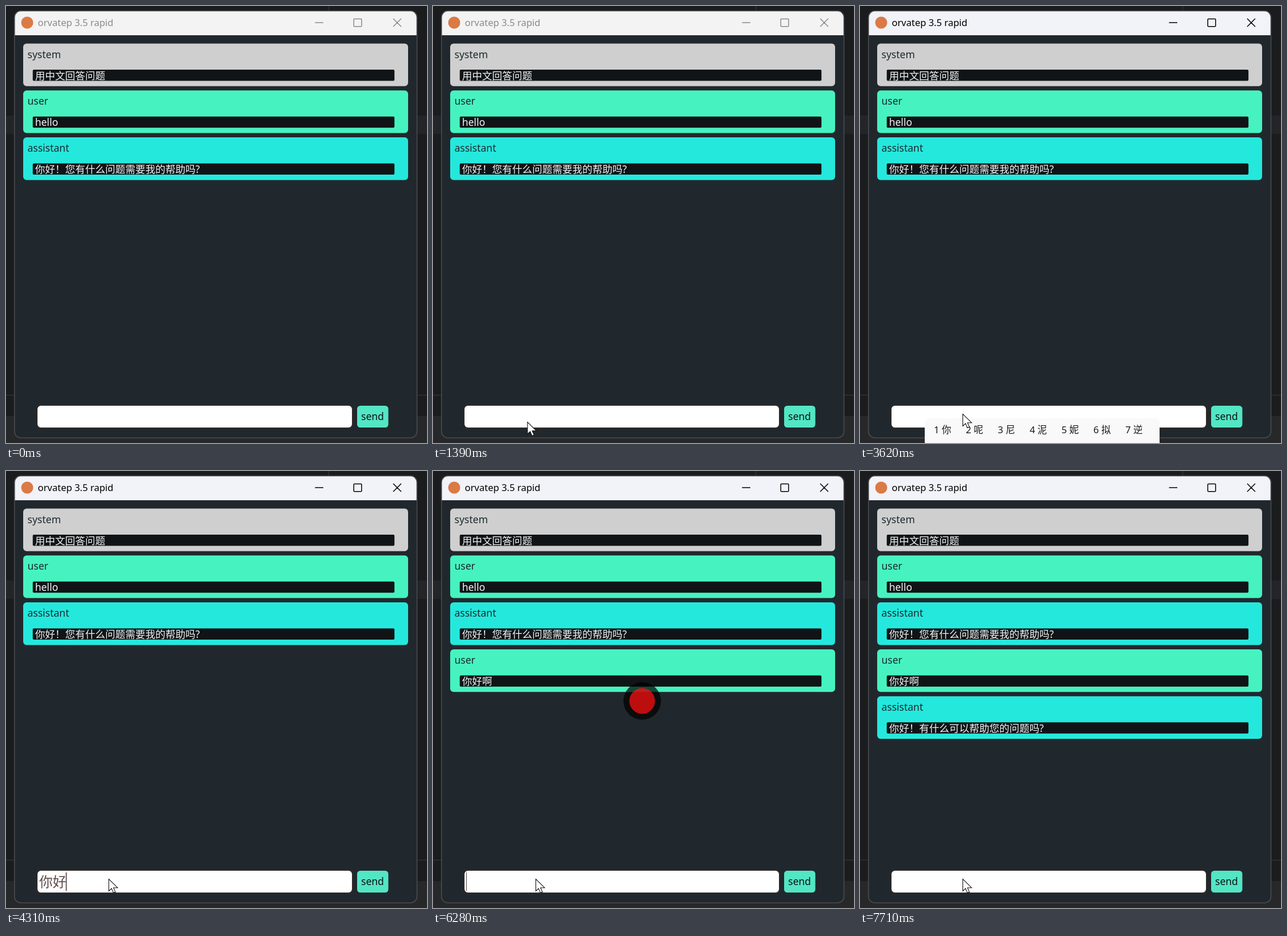
Write an HTML page that moves like this. It is 735x762 px and loops after 8 s.

```html
<!DOCTYPE html>
<html lang="zh-CN">
<head>
<meta charset="utf-8">
<title>Chat window</title>
<style>
  html, body { margin: 0; width: 100%; height: 100%; overflow: hidden; background: #1b1c1e; }
  svg { display: block; width: 735px; height: 762px; }
  text { font: 17.5px "Noto Sans", "Noto Sans CJK SC", sans-serif; white-space: pre; }
  #title { font-size: 16.5px; }
  #typed { font-size: 23.5px; fill: #5d4a4a; }
  .label { fill: #1c2a2e; }
  .body { fill: #f2f4f4; }
  .candidate { font-size: 16.5px; fill: #1b1b1b; }
</style>
</head>
<body>
<svg viewBox="0 0 735 762">
  <!-- desktop behind the window -->
  <rect width="735" height="762" fill="#1b1c1e"/>
  <rect y="191" width="735" height="32" fill="#242528"/>
  <rect y="715" width="735" height="47" fill="#27282a"/>
  <path d="M0 678.5H735M563.5 0V8" stroke="#38393b"/>

  <!-- window -->
  <rect x="14.8" y="8.5" width="702.7" height="744.5" rx="11" fill="#21282d" stroke="#484b4d" stroke-width="1.6"/>
  <path id="bar" d="M15.6 51V20a10.5 10.5 0 0 1 10.5-10.7H706.2A10.5 10.5 0 0 1 716.7 20V51Z"/>
  <circle cx="37" cy="29" r="10.5" fill="#db7a45"/>
  <text id="title" x="55.5" y="35">orvatep 3.5 rapid</text>
  <path id="buttons" fill="none" stroke-width="1.5"
        d="M539.5 29H554M608.2 22.5H619.8a1 1 0 0 1 1 1V34.8a1 1 0 0 1-1 1H608.2a1 1 0 0 1-1-1V23.5a1 1 0 0 1 1-1ZM676 22L690 36M690 22L676 36"/>

  <g id="cards"></g>
  <g id="spinner">
    <circle cx="365.2" cy="401" r="32.8" fill="rgba(0,0,0,.71)"/>
    <circle id="pulse" cx="365.2" cy="401" fill="rgba(255,16,16,.73)"/>
  </g>

  <!-- input row -->
  <rect x="54" y="696" width="551" height="40" rx="7" fill="#fff" stroke="#2d2a28" stroke-width="2"/>
  <text id="typed" x="58" y="725"></text>
  <rect id="caret" y="700" height="32" fill="#5d4a4a"/>
  <rect x="613" y="697" width="54.5" height="38" rx="5.5" fill="#53e6c4"/>
  <text x="620" y="722" fill="#0c1214">send</text>

  <g id="popups"></g>
  <path id="cursor" d="M.5 .5V21.4L5.2 17L8.6 24.6L12 23.1L8.7 15.7H15.9Z" fill="#fff" stroke="#111" stroke-width="1.1"/>
</svg>
<script>
const LOOP = 8000;
const $ = id => document.getElementById(id);
const show = (el, on) => el.setAttribute('visibility', on ? 'visible' : 'hidden');
const mix = (a, b, k) => Math.round(a + (b - a) * k);
const clamp = v => Math.min(1, Math.max(0, v));

function add(parent, tag, attrs, text = '') {
  const el = document.createElementNS('http://www.w3.org/2000/svg', tag);
  for (const key in attrs) el.setAttribute(key, attrs[key]);
  el.textContent = text;
  parent.append(el);
  return el;
}

const fills = { system: '#cfcfcf', user: '#46f3c0', assistant: '#25e8dd' };
const cards = [
  { role: 'system', text: '用中文回答问题', from: 0 },
  { role: 'user', text: 'hello', from: 0 },
  { role: 'assistant', text: '你好！您有什么问题需要我的帮助吗?', from: 0 },
  { role: 'user', text: '你好啊', from: 5540 },
  { role: 'assistant', text: '你好！有什么可以帮助您的问题吗?', from: 7170 }
];
cards.forEach((card, i) => {
  const g = card.el = add($('cards'), 'g', { transform: `translate(30 ${65.5 + i * 81.8})` });
  add(g, 'rect', { width: 672, height: 74.3, rx: 6, fill: fills[card.role] });
  add(g, 'text', { x: 7.5, y: 25, class: 'label' }, card.role);
  add(g, 'rect', { x: 16.7, y: 45.5, width: 631.5, height: 19.5, rx: 2, fill: '#101417' });
  add(g, 'text', { x: 20.7, y: 62, class: 'body' }, card.text);
});

// Input method candidate lists
const popups = [
  { from: 3620, to: 3840, x: 113, w: 410, words: '你 呢 尼 泥 妮 拟 逆' },
  { from: 3840, to: 4310, x: 113, w: 596, words: '你好 拟好 你 呢 尼 泥 妮' },
  { from: 4750, to: 5310, x: 105, w: 410, words: '啊 阿 呵 吖 嗄 锕 腌' }
];
for (const p of popups) {
  const g = p.el = add($('popups'), 'g', { transform: `translate(${p.x} 719)` });
  add(g, 'rect', { width: p.w, height: 60, rx: 7, fill: '#f9f9f9' });
  p.words.split(' ').forEach((word, i) =>
    add(g, 'text', { x: 16 + i * (p.w - 20) / 7, y: 26, class: 'candidate' }, `${i + 1} ${word}`));
}

// [time, x, y] of the pointer tip
const path = [
  [330, 650, 765], [480, 560, 430], [620, 430, 312], [750, 315, 373.5],
  [930, 205, 600], [1120, 162, 729], [1150, 162, 728], [1290, 162, 728],
  [1500, 168, 721], [1800, 179, 711], [LOOP, 179, 711]
];
function slope(i, axis) {
  const a = path[i - 1], b = path[i + 1];
  return a && b && i < path.length - 2 ? (b[axis] - a[axis]) / (b[0] - a[0]) : 0;
}
function pointer(t) {
  const i = Math.max(0, path.findIndex(p => p[0] > t) - 1);
  const a = path[i], b = path[i + 1], d = b[0] - a[0], k = clamp((t - a[0]) / d);
  return [1, 2].map(n =>
    a[n] + (b[n] - a[n]) * k * k * (3 - 2 * k) +
    d * k * (1 - k) * (slope(i, n) * (1 - k) - slope(i + 1, n) * k));
}

const blinks = [1880, 2410, 2920, 3450, 3960, 4480, 5010, 5540, 6100, 6630, 7170, 7710];
const typedAt = t => t >= 4310 && t < 5310 ? '你好' : t >= 5310 && t < 5540 ? '你好啊' : '';

function draw(t) {
  const focus = clamp((t - 1880) / 160);
  const ink = mix(138, 0, focus);
  const shade = mix(243, 242, focus);
  $('bar').setAttribute('fill', `rgb(${shade},${shade},${mix(243, 249, focus)})`);
  $('title').setAttribute('fill', `rgb(${ink},${ink},${ink})`);
  $('buttons').setAttribute('stroke', `rgb(${ink},${ink},${ink})`);

  for (const c of cards) show(c.el, t >= c.from);
  for (const p of popups) show(p.el, t >= p.from && t < p.to);

  show($('spinner'), t >= 5540 && t < 7170);
  $('pulse').setAttribute('r', 32.8 * Math.abs(Math.sin((t - 6280) / 500 + 0.75)));

  const typed = typedAt(t);
  $('typed').textContent = typed;
  $('caret').setAttribute('x', typed ? 57.2 + typed.length * 23.6 : 58);
  $('caret').setAttribute('width', typed ? 1.7 : 1);
  show($('caret'), blinks.filter(b => b <= t).length % 2);

  show($('cursor'), t >= 330);
  $('cursor').setAttribute('transform', `translate(${pointer(t)})`);
}

function tick() {
  draw(performance.now() % LOOP);
  requestAnimationFrame(tick);
}
tick();
</script>
</body>
</html>
```
